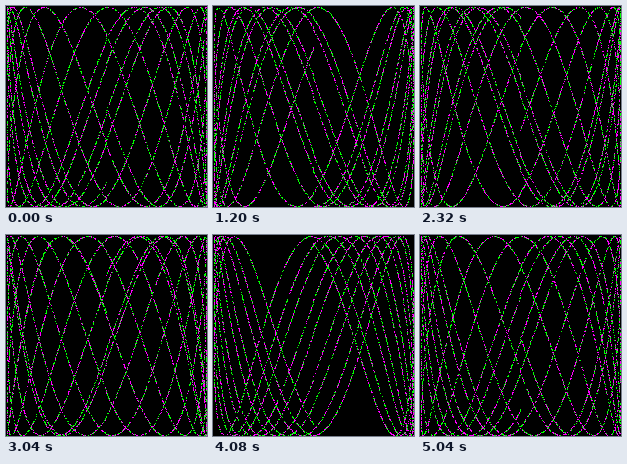
An HTML page with a canvas for the animation above (5120 ms loop, 201x201 px).

```html
<!DOCTYPE html>
<html>
<head>
<meta charset="utf-8">
<style>
html, body { margin: 0; width: 100%; height: 100%; overflow: hidden; background: #000; }
canvas { display: block; width: 201px; height: 201px; image-rendering: pixelated; }
</style>
</head>
<body>
<canvas id="stage" width="201" height="201"></canvas>
<script>
const SIZE = 100, SIDE = 2 * SIZE + 1;
const STEPS = 64, DELAY = 80;
const CYCLES = 5, RES = 0.001, FREQ = 2.873;
// Black, green and magenta as little-endian ABGR
const PALETTE = [0xff000000, 0xff00ff00, 0xffff00ff];

const ctx = document.getElementById('stage').getContext('2d');
const image = ctx.createImageData(SIDE, SIDE);
const pixels = new Uint32Array(image.data.buffer);

function seededRandom(seed) {
  return () => {
    seed = (seed + 0x6d2b79f5) | 0;
    let h = Math.imul(seed ^ (seed >>> 15), seed | 1);
    h ^= h + Math.imul(h ^ (h >>> 7), h | 61);
    return ((h ^ (h >>> 14)) >>> 0) / 4294967296;
  };
}

const toPixel = v => SIZE + Math.trunc(v * SIZE + 0.5);

function drawLissajous(step) {
  const random = seededRandom(step * 7919 + 1);
  const phase = step * 0.1;
  pixels.fill(PALETTE[0]);
  for (let t = 0; t < CYCLES * 2 * Math.PI; t += RES) {
    const x = toPixel(Math.sin(t));
    const y = toPixel(Math.sin(t * FREQ + phase));
    pixels[y * SIDE + x] = PALETTE[Math.floor(random() * PALETTE.length)];
  }
  ctx.putImageData(image, 0, 0);
}

const start = performance.now();
let shown = -1;

function tick() {
  const step = Math.floor((performance.now() - start) / DELAY) % STEPS;
  if (step !== shown) drawLissajous(shown = step);
  requestAnimationFrame(tick);
}
tick();
</script>
</body>
</html>
```
